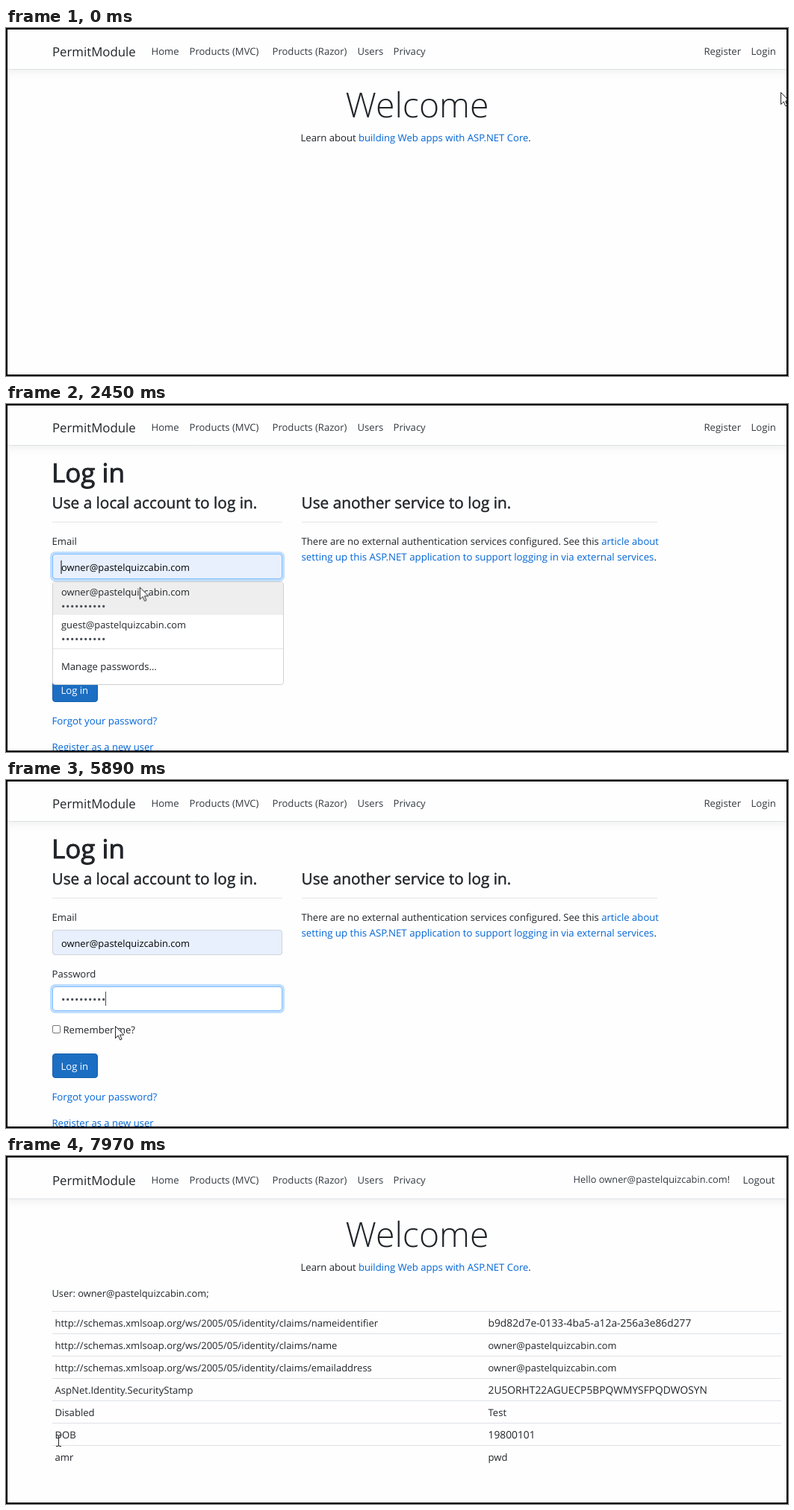
These frames come from a looping animation (1047x467 px, 8000 ms). An HTML page:

```html
<!DOCTYPE html>
<html lang="en">
<head>
<meta charset="utf-8">
<title>Log in demo</title>
<style>
/* One loop is 8 s, so 1% is 80 ms. */
html, body { margin: 0; width: 100%; height: 100%; overflow: hidden; background: #fefefe; }
svg { display: block; width: 1047px; height: 467px; }
text { font: 13.1px "Open Sans", "Noto Sans", sans-serif; fill: #212529; text-rendering: geometricPrecision; white-space: pre; }
text.nav { fill: #343a40; }
text.brand { font-size: 16.8px; fill: #212529; }
text.title { font-size: 46.4px; font-weight: 300; text-anchor: middle; }
text.h1 { font-size: 35px; stroke: #212529; stroke-width: 1px; }
text.h2 { font-size: 20.8px; stroke: #212529; stroke-width: .45px; }
text.mail { font-size: 12.85px; }
text.code { font-size: 13.8px; }
text.url { font-size: 13px; }
text.wide { font-size: 13.28px; }
text.field { fill: #000; }
text.link, .link { fill: #0366d6; }
.field-box { fill: #fff; stroke: #ced4da; }
.ring { fill: none; stroke: #bfdeff; stroke-width: 3; }
.focus { fill: none; stroke: #80bdff; }
.caret { stroke: #000; }
.dots { fill: none; stroke: #495057; stroke-width: 3.3; stroke-linecap: round; stroke-dasharray: 0 6; }
.rule { stroke: #e5e5e5; }

.step { animation: 8s step-end infinite; }
#bar, #navText { animation-name: shift; }
#bar { --dy: 2px; filter: drop-shadow(0 3.6px 5.4px rgba(0,0,0,.06)); }
#navText { --dy: 1px; }
#guestNav { animation-name: guest; }
#home { animation-name: home; }
#login { animation-name: login; }
#account { animation-name: account; }
#mailFocus { animation-name: mailFocus; }
#mailFill, #pickedRow { animation-name: picked; }
#mailCaret { animation-name: mailCaret; }
#menu { animation-name: menu; }
#passFocus { animation-name: passFocus; }
#typing, #passCaret { animation-name: typing; }
#passCaret { stroke: #495057; }
#button { animation-name: hover; }
#buttonRing { animation-name: pressed; }
#arrow { animation-name: arrow; }
#hand { animation-name: hand; }
#beam { animation-name: beam; }
#pointer { animation: move 8s linear infinite; }

@keyframes shift { 0% { transform: none } 81.75%, to { transform: translateY(var(--dy)) } }
@keyframes guest { 0% { opacity: 1 } 81.75%, to { opacity: 0 } }
@keyframes home { 0% { opacity: 1 } 8.5%, to { opacity: 0 } }
@keyframes login { 0%, 81.75%, to { opacity: 0 } 8.5% { opacity: 1 } }
@keyframes account { 0% { opacity: 0 } 81.75%, to { opacity: 1 } }
@keyframes mailFocus { 0%, 40.5%, to { opacity: 0 } 22.375% { opacity: 1 } }
@keyframes picked { 0% { opacity: 0 } 30.5%, to { opacity: 1 } }
@keyframes mailCaret { 0%, 34.5% { transform: translateX(172.5px) } 22.375% { transform: none } }
@keyframes menu { 0%, 34.5%, to { opacity: 0 } 23% { opacity: 1 } }
@keyframes passFocus { 0%, 80.75%, to { opacity: 0 } 40.5% { opacity: 1 } }
@keyframes typing {
  0% { transform: none }
  45% { transform: translateX(6px) }
  47.875% { transform: translateX(12px) }
  52.625% { transform: translateX(18px) }
  54.75% { transform: translateX(24px) }
  55.75% { transform: translateX(30px) }
  60.5% { transform: translateX(36px) }
  63.625% { transform: translateX(42px) }
  66.25% { transform: translateX(48px) }
  68.75% { transform: translateX(54px) }
  71.625%, to { transform: translateX(60px) }
}
@keyframes hover { 0% { fill: #1b6ec2; stroke: #1861ac } 75.25%, to { fill: #0069d9; stroke: #0062cc } }
@keyframes pressed { 0% { opacity: 0 } 80.75%, to { opacity: 1 } }
@keyframes arrow {
  0%, 12.5%, 30.25%, 72.625%, 81.75% { opacity: 1 }
  2.375%, 20.125%, 39.875%, 75.25%, 99%, to { opacity: 0 }
}
@keyframes hand { 0%, 12.5%, 81.75%, to { opacity: 0 } 2.375%, 75.25% { opacity: 1 } }
@keyframes beam { 0%, 30.25%, 72.625% { opacity: 0 } 20.125%, 39.875%, 99%, to { opacity: 1 } }
@keyframes move {
  0%, .375% { transform: translate(1037px, 86px) }
  1.75% { transform: translate(1028px, 58px) }
  3.125%, 12% { transform: translate(1014px, 31px) }
  13.5% { transform: translate(930px, 70px) }
  15.5% { transform: translate(640px, 160px) }
  17.5% { transform: translate(340px, 240px) }
  18.75% { transform: translate(215px, 264px) }
  19.5% { transform: translate(195px, 262px) }
  21%, 29.375% { transform: translate(185px, 216px) }
  31%, 33.875% { transform: translate(177px, 254px) }
  34.75%, 35.75% { transform: translate(175px, 250px) }
  36.875%, 38.875% { transform: translate(174px, 258px) }
  40.5%, 71.75% { transform: translate(170px, 288px) }
  73.5%, 74.125% { transform: translate(146px, 330px) }
  75.5% { transform: translate(118px, 378px) }
  77% { transform: translate(100px, 398px) }
  80.75%, 88.75% { transform: translate(91px, 387px) }
  91% { transform: translate(150px, 290px) }
  93% { transform: translate(242px, 184px) }
  95.5% { transform: translate(155px, 300px) }
  97.5% { transform: translate(92px, 401px) }
  98.75% { transform: translate(74px, 389px) }
  99.5%, to { transform: translate(70px, 382px) }
}
</style>
</head>
<body>
<svg viewBox="0 0 1047 467">
  <rect width="1047" height="467" fill="#fefefe"/>

  <g id="bar" class="step">
    <path d="M0-4H1047V56H0z" fill="#fefefe"/>
    <path d="M0 55.5H1047" stroke="#dee2e6"/>
  </g>
  <g id="navText" class="step">
    <text class="brand" x="62" y="38">PermitModule</text>
    <text class="nav" x="194.5" y="36">Home</text>
    <text class="nav" x="245.5" y="36">Products (MVC)</text>
    <text class="nav" x="356.5" y="36">Products (Razor)</text>
    <text class="nav" x="470.5" y="36">Users</text>
    <text class="nav" x="518.5" y="36">Privacy</text>
  </g>
  <g id="guestNav" class="step">
    <text class="nav" x="934.5" y="36">Register</text>
    <text class="nav" x="997.5" y="36">Login</text>
  </g>

  <g id="home" class="step">
    <text class="title" x="550.5" y="120">Welcome</text>
    <text x="394.5" y="152">Learn about <tspan class="link">building Web apps with ASP.NET Core</tspan>.</text>
  </g>

  <g id="login" class="step">
    <text class="h1" x="61" y="105">Log in</text>
    <text class="h2" x="61.5" y="140">Use a local account to log in.</text>
    <text class="h2" x="395.5" y="140">Use another service to log in.</text>
    <path class="rule" d="M62 158.5H370M396 158.5H872"/>
    <text x="395.5" y="189">There are no external authentication services configured. See this <tspan class="link">article about</tspan></text>
    <text class="wide" x="395.5" y="210"><tspan class="link">setting up this ASP.NET application to support logging in via external services</tspan>.</text>

    <text x="61.5" y="189">Email</text>
    <rect class="field-box" x="62.5" y="201.5" width="307" height="33" rx="3.5"/>
    <g id="mailFill" class="step">
      <rect class="field-box" style="fill:#e8f0fe" x="62.5" y="201.5" width="307" height="33" rx="3.5"/>
      <text class="mail field" x="74" y="224">owner@pastelquizcabin.com</text>
    </g>
    <g id="mailFocus" class="step">
      <rect class="ring" x="60.5" y="199.5" width="311" height="37" rx="5"/>
      <rect class="focus" x="62.5" y="201.5" width="307" height="33" rx="3.5"/>
      <path id="mailCaret" class="caret step" d="M74 210V228"/>
    </g>

    <text x="61.5" y="265">Password</text>
    <rect class="field-box" x="62.5" y="277.5" width="307" height="32" rx="3.5"/>
    <path class="dots" d="M76.7 294.5h54.1"/>
    <g id="typing" class="step">
      <path d="M74 285h62v18h-62z" fill="#fff"/>
    </g>
    <g id="passFocus" class="step">
      <rect class="ring" x="60.5" y="275.5" width="311" height="36" rx="5"/>
      <rect class="focus" x="62.5" y="277.5" width="307" height="32" rx="3.5"/>
      <path id="passCaret" class="step" d="M73.5 284V303"/>
    </g>

    <rect x="62.5" y="329.5" width="10" height="10" rx="1.5" fill="#fff" stroke="#767676"/>
    <text x="76.5" y="340">Remember me?</text>
    <rect id="buttonRing" class="ring step" x="60.5" y="365.5" width="64" height="36" rx="5"/>
    <rect id="button" class="step" x="62.5" y="367.5" width="60" height="32" rx="3.5"/>
    <text style="fill:#fff" x="73.5" y="389">Log in</text>
    <text class="link wide" x="61.5" y="430">Forgot your password?</text>
    <text class="link" x="61.5" y="465">Register as a new user</text>

    <g id="menu" class="step">
      <rect x="62.5" y="238.5" width="309" height="138" rx="3" fill="#fff" stroke="#d0d0d0"/>
      <rect id="pickedRow" class="step" x="63" y="239" width="308" height="44" fill="#eee"/>
      <text class="mail" x="74" y="257">owner@pastelquizcabin.com</text>
      <path class="dots" d="M76.7 271.5h54.1"/>
      <text class="mail" x="74" y="301">guest@pastelquizcabin.com</text>
      <path class="dots" d="M76.7 315.5h54.1"/>
      <path class="rule" d="M63 328.5H371"/>
      <text x="74" y="357">Manage passwords…</text>
    </g>
  </g>

  <g id="account" class="step">
    <text class="nav mail" x="759.5" y="36">Hello owner@pastelquizcabin.com!</text>
    <text class="nav wide" x="986.5" y="37">Logout</text>
    <text class="title" x="550.5" y="122">Welcome</text>
    <text x="394.5" y="154">Learn about <tspan class="link">building Web apps with ASP.NET Core</tspan>.</text>
    <text class="mail" x="61.5" y="189">User: owner@pastelquizcabin.com;</text>
    <path stroke="#dee2e6" d="M62 208.5h976m-976 30h976m-976 30h976m-976 30h976m-976 30h976m-976 30h976m-976 30h976"/>
    <text class="url" x="65.5" y="229">http://schemas.xmlsoap.org/ws/2005/05/identity/claims/nameidentifier</text>
    <text class="code" x="645.5" y="229">b9d82d7e-0133-4ba5-a12a-256a3e86d277</text>
    <text class="url" x="65.5" y="259">http://schemas.xmlsoap.org/ws/2005/05/identity/claims/name</text>
    <text class="mail" x="645.5" y="259">owner@pastelquizcabin.com</text>
    <text class="url" x="65.5" y="289">http://schemas.xmlsoap.org/ws/2005/05/identity/claims/emailaddress</text>
    <text class="mail" x="645.5" y="289">owner@pastelquizcabin.com</text>
    <text x="65.5" y="319">AspNet.Identity.SecurityStamp</text>
    <text class="code" x="645.5" y="319">2U5ORHT22AGUECP5BPQWMYSFPQDWOSYN</text>
    <text x="65.5" y="349">Disabled</text>
    <text x="645.5" y="349">Test</text>
    <text x="65.5" y="379">DOB</text>
    <text class="code" x="645.5" y="379">19800101</text>
    <text x="65.5" y="409">amr</text>
    <text x="645.5" y="409">pwd</text>
  </g>

  <g id="pointer" fill="#fff" stroke="#222">
    <path id="arrow" class="step" d="M.5.5V16.5L4.2 13 6.8 18.8 9.1 17.8 6.6 12.1H11.8z"/>
    <path id="hand" class="step" d="M-1.5 12V1.5Q-1.5-.5 0-.5T1.5 1.5V7Q4 5.5 4.5 7.5 7 6.5 7.5 8.5 10.5 7.5 10.5 10.5V15Q10.5 18 8.5 21H0Q-1 18-5 12.5-6 10.5-4.5 10-3 9.5-1.5 12z"/>
    <path id="beam" class="step" fill="none" d="M-3-7.5H-1Q.5-7.5.5-6V6Q.5 7.5-1 7.5H-3M4-7.5H2Q.5-7.5.5-6M.5 6Q.5 7.5 2 7.5H4"/>
  </g>
  <rect x="1" y="1" width="1045" height="465" fill="none" stroke="#000" stroke-width="2"/>
</svg>
</body>
</html>
```
